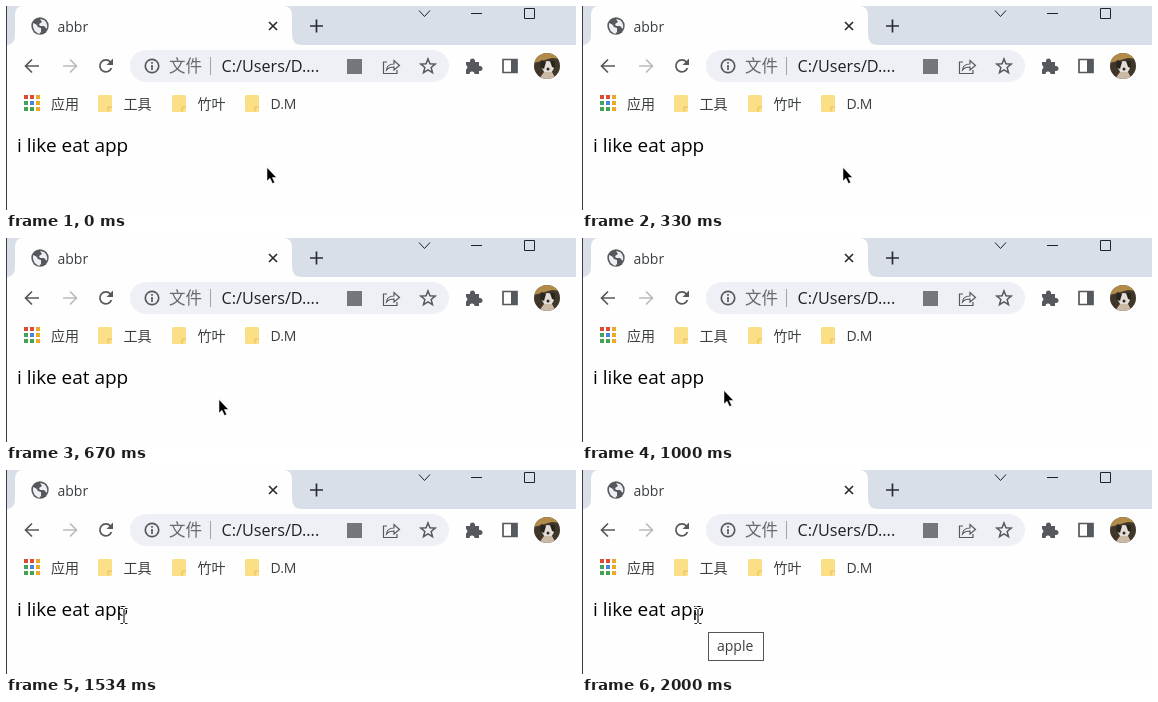
Write an HTML page that moves like this. It is 570 px wide and 204 px high and loops after 2.33 s.

```html
<!DOCTYPE html>
<html lang="zh">
<head>
<meta charset="utf-8">
<title>abbr</title>
<style>
  html, body { margin: 0; width: 100%; height: 100%; overflow: hidden; background: #fefefe; }
  svg { display: block; width: 100vw; height: 100vh; }
  text { font-family: "Open Sans", "Noto Sans CJK SC", "Noto Sans CJK", sans-serif; fill: #3c4043; }
  .ui { font-size: 14px; }
  .line { fill: none; stroke: #55585c; stroke-width: 1.7; }
  .thin { fill: none; stroke: #222; stroke-width: 1; }
</style>
</head>
<body>
<svg viewBox="0 0 570 204">
  <rect width="570" height="204" fill="#fefefe"/>

  <!-- tab strip -->
  <rect width="570" height="39" fill="#d9dfe8"/>
  <path d="M0 39Q9 39 9 29V9Q9 0 17 0H277Q286 0 286 9V29Q286 39 296 39Z" fill="#fefefe"/>
  <circle cx="34" cy="20" r="8.7" fill="#55585c"/>
  <path d="M27 17Q31 18 32 21L35 22V26L33 28Q26 25 27 17ZM34 13L38 14Q42 17 41 23L38 20H34L33 18L36 16Z" fill="#eceef1"/>
  <text class="ui" x="51.500" y="25.500">abbr</text>
  <path class="line" d="M263 16L271 24M271 16L263 24" style="stroke:#2b2d30"/>
  <path class="line" d="M304 20H317M310.500 13.500V26.500" style="stroke:#2b2d30"/>
  <path class="thin" d="M413 4.500L418.500 10.500L424 4.500M465 7.500H476M518.500 2.500H528.500V12.500H518.500Z"/>

  <!-- toolbar -->
  <path class="line" d="M33 60H20M26 53.500L19.500 60L26 66.500"/>
  <path class="line" d="M57 60H70M64 53.500L70.500 60L64 66.500" style="stroke:#babcbe"/>
  <path class="line" d="M104.500 56A6 6 0 1 0 105.500 62"/>
  <path d="M107 52.500V59H100.500Z" fill="#55585c"/>
  <rect x="124" y="44" width="319" height="32" rx="16" fill="#eff0f6"/>
  <circle class="line" cx="146" cy="60" r="6.700"/>
  <path class="line" d="M146 59V64M146 56V57.800"/>
  <text x="163" y="66" font-size="16.500" style="fill:#65686c">文件</text>
  <path class="thin" d="M204.500 51V69" style="stroke:#a0a3a8"/>
  <text x="215.500" y="66" font-size="16.200" style="fill:#202124">C:/Users/D....</text>
  <rect x="341" y="53" width="15" height="15" fill="#73767a"/>
  <path class="line" d="M381 56H377.500V67.500H391V64M380.500 64Q381 58 388 58V54.500L393.500 59.500L388 64V61Q383 61 380.500 64Z" style="stroke-width:1.200"/>
  <path class="line" id="star" style="stroke-width:1.500"/>
  <path d="M460 56H464V55A2.500 2.500 0 0 1 469 55V56H473V60H474A2.500 2.500 0 0 1 474 65H473V68H468.500A2.500 2.500 0 0 0 463.500 68H460V63.500A2.500 2.500 0 0 0 460 59Z" fill="#55585c"/>
  <path class="line" d="M497 53.500H511V66.500H497Z"/>
  <rect x="505" y="53" width="6" height="14" fill="#55585c"/>
  <clipPath id="round"><circle cx="541" cy="60" r="13"/></clipPath>
  <g clip-path="url(#round)">
    <rect x="528" y="47" width="26" height="26" fill="#403629"/>
    <path d="M528 47H554V53L546 52L528 57Z" fill="#b18b47"/>
    <ellipse cx="542" cy="61" rx="6" ry="6" fill="#e6ded5"/>
    <path d="M535 54L540 56L538 63L534 61ZM544 55L549 55L549 62L546 61Z" fill="#292522"/>
    <path d="M533 73L538 66H546L550 73Z" fill="#c9b9a5"/>
    <circle cx="542" cy="63" r="1.500" fill="#292522"/>
  </g>

  <!-- bookmarks -->
  <g id="marks"></g>

  <!-- page -->
  <text x="11" y="146" font-size="19" style="fill:#000">i like eat app</text>
  <g id="tip">
    <rect x="126.500" y="162.500" width="55" height="28" fill="#fefefe" stroke="#555"/>
    <text class="ui" x="135" y="181">apple</text>
  </g>
  <path id="arrow" d="M0 0V13.500L3 10.700L5.500 16L7.700 15L5.300 10H9.500Z" fill="#000" stroke="#fff" stroke-width=".5"/>
  <g id="beam" fill="none">
    <path d="M-4 -7.500H4M-4 7.500H4M0 -8V8" stroke="#fff" stroke-width="3"/>
    <path d="M-3.500 -7.500H-1M1 -7.500H3.500M-3.500 7.500H-1M1 7.500H3.500M0 -7V7" stroke="#222" stroke-width="1.200"/>
  </g>
  <path d="M.5 0V204" stroke="#3c3c3c"/>
</svg>
<script>
const $ = id => document.getElementById(id);
const LOOP = 2330;

const apps = ['#e2492f', '#e2492f', '#eba928', '#42a452', '#4b82dd', '#eba928', '#42a452', '#42a452', '#eba928'];
const square = (color, i) =>
  `<rect x="${18 + i % 3 * 6}" y="${89 + Math.floor(i / 3) * 6}" width="4" height="4" fill="${color}"/>`;
const folder = x =>
  `<rect x="${x}" y="89" width="14" height="17" rx="1.5" fill="#fbdf86"/>` +
  `<path d="M${x + 10} 105.500V101H${x + 14}" fill="none" stroke="#e9bf55"/>`;
const label = (x, words) => `<text class="ui" x="${x}" y="103">${words}</text>`;

$('marks').innerHTML = apps.map(square).join('') + label(45, '应用') +
  [[92, '工具'], [166, '竹叶'], [239, 'D.M']]
    .map(([x, words]) => folder(x) + label(x + 25.5, words)).join('');

const starPoint = (_, i) => {
  const r = i % 2 ? 3.3 : 7.6, a = i * Math.PI / 5;
  return `${(422 + r * Math.sin(a)).toFixed(2)} ${(60.5 - r * Math.cos(a)).toFixed(2)}`;
};
$('star').setAttribute('d', `M${Array.from({ length: 10 }, starPoint).join('L')}Z`);

// The pointer jumps between rests: start time, shape, x, y
const rests = [
  [0, 'arrow', 261, 161.5],
  [670, 'arrow', 213, 161.5],
  [1000, 'arrow', 142, 152.5],
  [1330, 'beam', 118, 146],
  [1670, 'beam', 116, 146]
];

function draw(t) {
  const [, shape, x, y] = rests.filter(rest => rest[0] <= t).pop();
  for (const id of ['arrow', 'beam']) {
    $(id).style.display = id === shape ? '' : 'none';
    $(id).setAttribute('transform', `translate(${x} ${y})`);
  }
  $('tip').style.display = t >= 2000 ? '' : 'none';
}

const start = performance.now();
function tick() {
  draw((performance.now() - start) % LOOP);
  requestAnimationFrame(tick);
}
tick();
</script>
</body>
</html>
```
